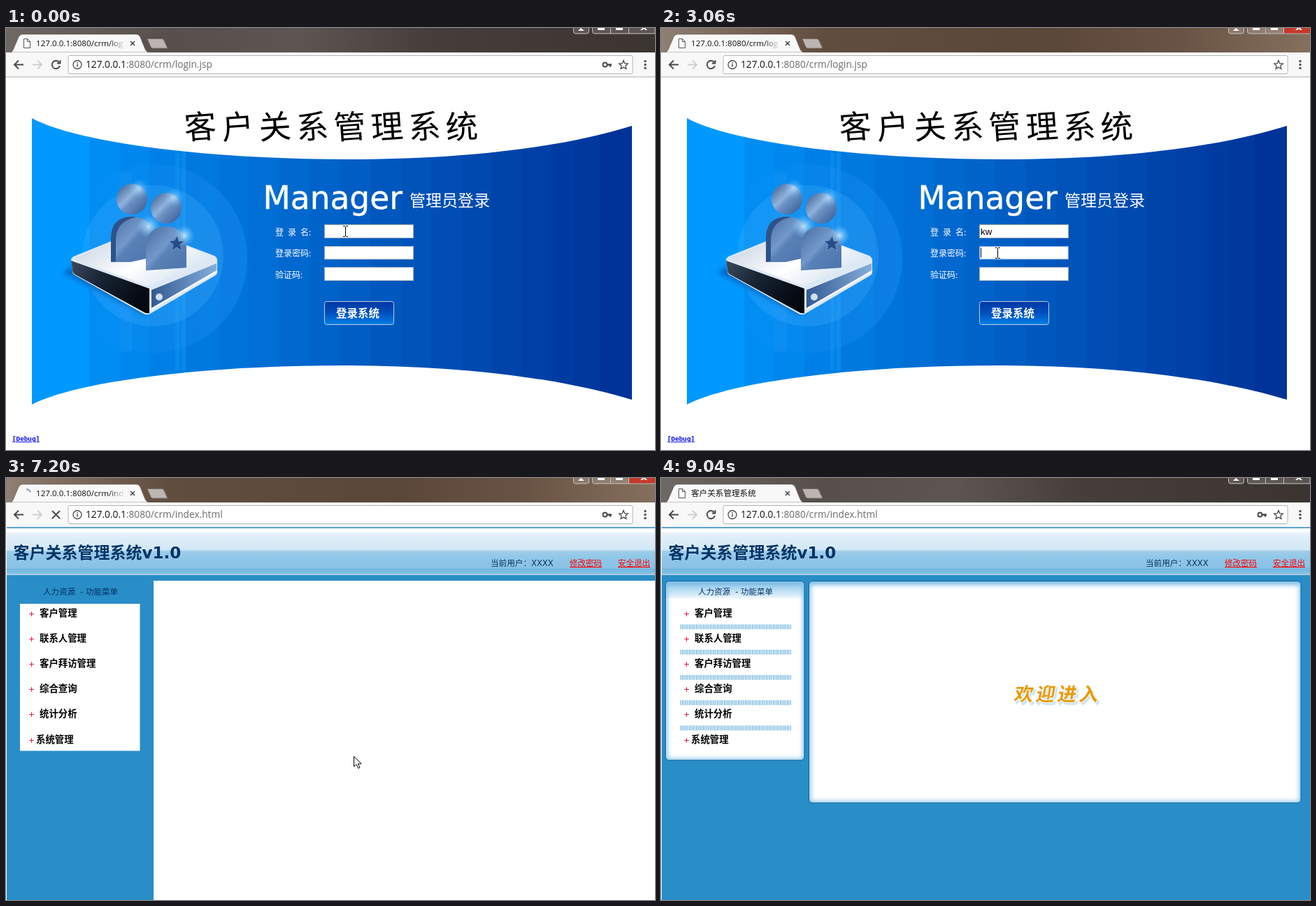
These frames come from a looping animation (928x604 px, 9.14 s). An HTML page:

```html
<!DOCTYPE html>
<html lang="zh">
<head>
<meta charset="utf-8">
<title>客户关系管理系统</title>
<style>
html, body { margin: 0; width: 100%; height: 100%; overflow: hidden; background: #fff; }
svg { display: block; width: 100vw; height: 100vh; }
text { font-family: "DejaVu Sans", "Noto Sans CJK SC", sans-serif; white-space: pre; }
.ui { font-family: "Open Sans", "Noto Sans CJK SC", sans-serif; }
.cjk { font-family: "Noto Sans CJK SC", "Noto Sans CJK", sans-serif; }
.field { font: 13.3px "Liberation Sans", sans-serif; }
.bold { font-weight: bold; }
.label { font-size: 12px; fill: #fff; }
.link { font-size: 11.5px; fill: #f00; text-decoration: underline; }
</style>
</head>
<body>
<svg viewBox="0 0 928 604">
<defs>
  <linearGradient id="barIdle">
    <stop offset="0" stop-color="#6e6865"/><stop offset=".25" stop-color="#574f4b"/>
    <stop offset=".45" stop-color="#5d5551"/><stop offset=".65" stop-color="#463e3b"/>
    <stop offset="1" stop-color="#3b3431"/>
  </linearGradient>
  <linearGradient id="barActive">
    <stop offset="0" stop-color="#8f7f74"/><stop offset=".1" stop-color="#7d6a5c"/>
    <stop offset=".25" stop-color="#614d3e"/><stop offset=".6" stop-color="#5b4737"/>
    <stop offset=".8" stop-color="#685344"/><stop offset="1" stop-color="#85705f"/>
  </linearGradient>
  <linearGradient id="tabFade">
    <stop offset="0" stop-color="#f8f8f8" stop-opacity="0"/><stop offset="1" stop-color="#f8f8f8"/>
  </linearGradient>
  <linearGradient id="halo">
    <stop offset=".15" stop-color="#2b9bff" stop-opacity="0"/><stop offset="1" stop-color="#2b9bff" stop-opacity=".3"/>
  </linearGradient>
  <linearGradient id="button" x2="0" y2="1">
    <stop offset="0" stop-color="#0037a6"/><stop offset=".5" stop-color="#0050bd"/><stop offset="1" stop-color="#0080e8"/>
  </linearGradient>
  <linearGradient id="person" y2="1">
    <stop offset="0" stop-color="#46699f"/><stop offset=".45" stop-color="#7399ca"/>
    <stop offset=".55" stop-color="#5981b6"/><stop offset="1" stop-color="#4c74ad"/>
  </linearGradient>
  <linearGradient id="head" x1=".1" y1=".1" x2=".9" y2=".9">
    <stop offset="0" stop-color="#4a6c9f"/><stop offset=".4" stop-color="#8fb2dc"/>
    <stop offset=".55" stop-color="#6b91c4"/><stop offset="1" stop-color="#3e639c"/>
  </linearGradient>
  <radialGradient id="shine"><stop offset="0" stop-color="#c8ecff" stop-opacity=".9"/><stop offset="1" stop-color="#6fc4ff" stop-opacity="0"/></radialGradient>
  <linearGradient id="slab" x2="1" y2=".6"><stop offset="0" stop-color="#b9c8da"/><stop offset=".6" stop-color="#fff"/><stop offset="1" stop-color="#d5e2f0"/></linearGradient>
  <linearGradient id="slabFront" x2="1" y2=".4"><stop offset="0" stop-color="#3b4a5e"/><stop offset=".45" stop-color="#182434"/><stop offset="1" stop-color="#050a12"/></linearGradient>
  <linearGradient id="slabSide"><stop offset="0" stop-color="#345a92"/><stop offset="1" stop-color="#86aedb"/></linearGradient>
  <linearGradient id="header" x2="0" y2="1">
    <stop offset="0" stop-color="#fff"/><stop offset=".06" stop-color="#fff"/><stop offset=".12" stop-color="#e3f0f9"/>
    <stop offset=".46" stop-color="#d2e7f5"/><stop offset=".49" stop-color="#9dcdea"/>
    <stop offset=".62" stop-color="#91c7e8"/><stop offset=".84" stop-color="#88c2e6"/>
    <stop offset=".87" stop-color="#75b7e0"/><stop offset=".96" stop-color="#82bfe4"/><stop offset="1" stop-color="#c3d4df"/>
  </linearGradient>
  <linearGradient id="menuHead" x2="0" y2="1"><stop offset="0" stop-color="#65b0df"/><stop offset=".35" stop-color="#a9d4ef"/><stop offset="1" stop-color="#ecf6fc"/></linearGradient>
  <linearGradient id="glow" x2="0" y2="1"><stop offset="0" stop-color="#72b8e4"/><stop offset="1" stop-color="#fff" stop-opacity="0"/></linearGradient>
  <pattern id="ticks" width="2.5" height="8" patternUnits="userSpaceOnUse"><rect width="1.3" height="8" fill="#74b5df"/></pattern>
  <filter id="soft" x="-20%" y="-20%" width="140%" height="140%"><feGaussianBlur stdDeviation="3"/></filter>
  <clipPath id="bannerClip">
    <path d="M37 129C105 166 300 188 490 188 660 188 800 170 895 140V532C800 503 660 483 480 483 290 483 105 504 37 539Z"/>
  </clipPath>
  <clipPath id="menuClip"><rect x="7" y="148" width="198" height="256" rx="5"/></clipPath>
  <clipPath id="mainClip"><rect x="212" y="148" width="703" height="317" rx="5"/></clipPath>
</defs>

<rect width="928" height="604" fill="#fff"/>

<g id="login">
  <g clip-path="url(#bannerClip)">
    <g id="stripes"></g>
    <path d="M162 207h18v256h-18zM242 178h6v312h-6zM251 178h6v312h-6z" fill="#2da0ff" opacity=".2"/>
    <circle cx="210" cy="330" r="135" fill="url(#halo)"/>
    <circle cx="210" cy="326" r="101" fill="#4db2ff" opacity=".24"/>
  </g>
  <path d="M80 350L100 338 206 396 200 412Z" fill="#0457ad" opacity=".65" filter="url(#soft)"/>
  <path d="M93 331Q94 328 99 326L188 290Q195 287 203 290L298 326Q303 329 302 335V350Q302 353 298 355L206 409Q201 412 195 408L99 354Q95 352 95 348Z" fill="#dce8f4"/>
  <path d="M96 330L192 291Q196 289 201 291L300 329 207 367Q203 369 198 367Z" fill="url(#slab)"/>
  <path d="M93 333L205 373V408Q200 409 196 406L99 353Q95 351 95 346Z" fill="url(#slabFront)"/>
  <path d="M208 375L301 337V347L208 401Z" fill="url(#slabSide)"/>
  <path d="M208 402L302 348" stroke="#fff" stroke-width="2"/>
  <circle cx="219" cy="385" r="5" fill="#cfe0f2"/>
  <path d="M150 335V300Q151 270 180 270 209 271 210 300V328L178 335Z" fill="url(#person)"/>
  <path d="M150 335V300Q151 270 180 270L186 271Q157 276 157 304V334Z" fill="#2f5288"/>
  <circle cx="180" cy="245" r="22" fill="url(#head)"/>
  <circle cx="204" cy="284" r="17" fill="url(#shine)"/>
  <path d="M200 347V315Q201 284 229 284 257 285 258 313V343Z" fill="url(#person)"/>
  <circle cx="229" cy="258" r="22" fill="url(#head)"/>
  <circle cx="255" cy="297" r="15" fill="url(#shine)"/>
  <circle cx="190" cy="230" r="14" fill="url(#shine)" opacity=".7"/>
  <circle cx="240" cy="243" r="14" fill="url(#shine)" opacity=".7"/>
  <path d="M245 297l2 8 8 0-6 5 3 9-8-5-7 5 2-9-6-5 8-1z" fill="#274c87" stroke="#83abd8" stroke-width=".7"/>

  <text class="cjk" x="256" y="159.500" font-size="46" font-weight="300" letter-spacing="7.4" rotate="-4">客户关系管理系统</text>
  <text x="367.500" y="259" font-size="45.5" fill="#fff" stroke="#fff" stroke-width=".4">Manager</text>
  <text class="cjk" x="577" y="254.500" font-size="23" fill="#fff">管理员登录</text>
  <text class="cjk label" x="385" y="296.500" word-spacing="3.3">登 录 名:</text>
  <text class="cjk label" x="385" y="326.500">登录密码:</text>
  <text class="cjk label" x="385" y="357.500">验证码:</text>
  <g fill="#fff" stroke="#9aa7b8">
    <rect id="nameBox" x="455.500" y="281.500" width="127" height="19"/>
    <rect id="passBox" x="455.500" y="312.500" width="127" height="18.500"/>
    <rect x="455.500" y="342.500" width="127" height="19"/>
  </g>
  <text id="name" class="field" x="457" y="295.500"></text>
  <g id="dots"></g>
  <rect id="caret" width="1" height="14"/>
  <g id="suggest">
    <rect id="suggestBox" x="455.500" y="301.500" width="129" fill="#fff" stroke="#a9b4c4"/>
    <text class="field bold" x="464" y="318.500">kw</text>
    <text id="second" class="field bold" x="464" y="340.500">k1</text>
  </g>
  <rect id="submit" x="455.500" y="391.500" width="99" height="33" rx="3" fill="url(#button)"/>
  <text class="cjk bold" x="472" y="413.500" font-size="15.5" fill="#fff">登录系统</text>
  <text x="9" y="591" style="font:bold 9.3px 'Liberation Mono',monospace" fill="#00e" text-decoration="underline">[Debug]</text>
</g>

<g id="index">
  <rect x="1" y="70" width="927" height="534" fill="#298dc8"/>
  <rect x="1" y="72" width="927" height="67" fill="url(#header)"/>
  <text class="bold" x="10.500" y="115" font-size="23" fill="#036">客户关系管理系统v1.0</text>
  <text x="693" y="126" font-size="11.6" fill="#0a3560">当前用户：XXXX</text>
  <text class="link" x="806" y="126">修改密码</text>
  <text class="link" x="875" y="126">安全退出</text>
  <g id="bare">
    <rect x="211" y="147" width="717" height="457" fill="#fff"/>
    <rect x="20" y="180" width="171.500" height="210.500" fill="#fff"/>
  </g>
  <g id="panels">
    <rect x="7" y="148" width="198" height="256" rx="5" fill="#fff"/>
    <g clip-path="url(#menuClip)">
      <rect x="7" y="148" width="198" height="24" fill="url(#menuHead)"/>
      <rect x="6" y="147" width="200" height="258" rx="6" fill="none" stroke="#8cc6ea" stroke-width="7" filter="url(#soft)"/>
    </g>
    <rect x="6.500" y="147.500" width="198.500" height="256.500" rx="5" fill="none" stroke="#0b619c"/>
    <rect x="212" y="148" width="703" height="317" rx="5" fill="#fff"/>
    <g clip-path="url(#mainClip)">
      <rect x="212" y="148" width="703" height="13" fill="url(#glow)"/>
      <rect x="211" y="147" width="705" height="319" rx="6" fill="none" stroke="#8cc6ea" stroke-width="7" filter="url(#soft)"/>
    </g>
    <rect x="211.500" y="147.500" width="703.500" height="317.500" rx="5" fill="none" stroke="#0b619c"/>
    <g id="dividers" fill="url(#ticks)"></g>
    <g transform="translate(504 319) skewX(-10)" class="bold" font-size="27" letter-spacing="4">
      <text class="cjk" x="3" y="3" fill="#cfe5f2" stroke="#cfe5f2" stroke-width="2">欢迎进入</text>
      <text class="cjk" fill="#e59c0c" stroke="#fff" stroke-width="2" paint-order="stroke">欢迎进入</text>
    </g>
  </g>
  <text x="53" y="167" font-size="11.5" font-weight="500" fill="#036">人力资源  - 功能菜单</text>
  <g id="menu" font-size="13.4"></g>
  <path d="M1 70.750H928" stroke="#6fa9cf" stroke-width="1.500"/>
</g>

<g id="chrome">
  <rect id="bar" width="928" height="35"/>
  <path d="M7 35Q10 33 12 27L18 13Q20 9 24 9H186Q190 9 192 13L198 28Q200 34 204 35Z" fill="#f8f8f8" stroke="#5a504b" stroke-width=".6"/>
  <path d="M202 15.500H223Q225 15.500 226 18L231 29H210Q208 29 207 27Z" fill="#bdb5b1" stroke="#756a64" stroke-width=".8"/>
  <g stroke="#c9c2bf" fill="#fff" fill-opacity=".16">
    <path d="M811.500-1V5q0 3 3 3h16q3 0 3-3V-1zM838.500-1V5q0 3 3 3H928V-1zM864.500-1V8M890.500-1V8"/>
  </g>
  <path id="closeRed" d="M891 0H928V7.500H891Z" fill="#c5392b"/>
  <path d="M818 4h9l-5-4zM846 0h10v3h-10zM872 0v3h10V0zM907 3l3-3h4l3 3h-3l-2-2-2 2z" fill="#fff"/>
  <rect y="35" width="928" height="35" fill="#f8f8f8"/>
  <path id="chromeLine" d="M0 70H928" stroke="#a9a9a9"/>
  <path id="page" d="M25.500 15.500h5l4 4v9h-9zM30.500 15.500v4h4" fill="#fff" stroke="#555"/>
  <path id="spinner" d="M29 16.500q4-1 6 4" fill="none" stroke="#8aa0b8" stroke-width="2"/>
  <text id="tab" class="ui" x="43" y="26" font-size="11.6" fill="#111"></text>
  <rect x="148" y="13" width="22" height="17" fill="url(#tabFade)"/>
  <path d="M178 19l6 6M184 19l-6 6" stroke="#444" stroke-width="1.500"/>
  <rect x="89" y="39.500" width="807" height="26" rx="2" fill="#fff" stroke="#b4b4b4"/>
  <g fill="none" stroke="#484848" stroke-width="1.900">
    <path d="M25 52.500H12M18 46.500l-6 6 6 6"/>
    <path d="M38 52.500H51M45 46.500l6 6-6 6" stroke="#cfcfcf"/>
    <path id="reload" d="M76 49A5.700 5.700 0 1 0 77 54M77.500 46v4.500H73"/>
    <path id="stop" d="M66 47l11 11M77 47l-11 11"/>
    <circle cx="102" cy="52.500" r="6" stroke-width="1.300"/>
    <path d="M102 51.500v4M102 49v1.500" stroke-width="1.500"/>
    <path d="M883 46.500l1.800 4.200 4.500.4-3.400 3 1 4.400-3.900-2.400-3.900 2.400 1-4.400-3.400-3 4.500-.4z" stroke-width="1.300"/>
    <g id="key"><circle cx="856.500" cy="52.500" r="3"/><path d="M859.500 52.500H866M864 52.500v3" stroke-width="2.400"/></g>
  </g>
  <path d="M912.500 46h3v3h-3zM912.500 51h3v3h-3zM912.500 56h3v3h-3z" fill="#555"/>
  <text class="ui" x="114" y="57" font-size="13.7" fill="#6a6a6a"><tspan fill="#111">127.0.0.1</tspan><tspan id="path"></tspan></text>
</g>

<g id="cursor" stroke="#000" fill="#fff">
  <path id="beam" d="M-3.500-7.500h2.500l1 1 1-1h2.500M0-6.500V6.500M-3.500 7.500h2.500l1-1 1 1h2.500" fill="none"/>
  <path id="arrow" d="M.500.500V15l3.400-3.200 2.700 5.700 2.300-1-2.600-5.500H11Z"/>
  <path id="hand" d="M1 2q0-2 1.700-2T4.500 2V7l1-.600 2 .800 1.500 0 1.500 1 1.500.600V14l-2 3v3.500H2V18L-2 12.500Q-4 9.500-2.500 9T1 12Z"/>
</g>
</svg>

<script>
const LOOP = 9140;
const $ = id => document.getElementById(id);
const show = (id, on) => $(id).setAttribute('display', on ? 'inline' : 'none');
const within = (t, from, to) => t >= from && t < to;

function add(parent, tag, attrs, text = '') {
  const el = document.createElementNS('http://www.w3.org/2000/svg', tag);
  for (const key in attrs) el.setAttribute(key, attrs[key]);
  el.textContent = text;
  $(parent).append(el);
}

const edges = [37, 119, 162, 205, 257, 306, 347, 390, 434, 478, 521, 565, 608, 652, 694, 737, 780, 812, 849, 896];
edges.slice(1).forEach((right, i) => {
  const left = edges[i];
  const k = (((left + right) / 2 - 78) / 794.5) ** .85;
  add('stripes', 'rect', {
    x: left, y: 120, width: right - left + .5, height: 425,
    fill: `rgb(0 ${153 - 102 * k} ${255 - 102 * k})`
  });
});

['客户管理', '联系人管理', '客户拜访管理', '综合查询', '统计分析', '系统管理'].forEach((item, i) => {
  const y = 197.5 + i * 36.2;
  add('menu', 'text', { x: 32, y, fill: '#e0002a', 'font-size': 11 }, '+');
  add('menu', 'text', { x: i < 5 ? 48 : 43, y, class: 'cjk bold' }, item);
  if (i < 5) add('dividers', 'rect', { x: 27, y: y + 12, width: 159, height: 7 });
});

for (let i = 0; i < 5; i++) add('dots', 'circle', { cx: 459.4 + i * 4.65, cy: 321.7, r: 1.9 });

// Cursor stops: time, shape, x, y
const stops = [
  [0, 'beam', 485.5, 291], [2100, 'beam', 486.5, 284.5], [2220, 'beam', 486.5, 288],
  [2360, 'beam', 486.5, 295], [2500, 'arrow', 485, 304], [2640, 'arrow', 483, 313],
  [2780, 'arrow', 482, 320], [2920, 'beam', 481.5, 322], [6190, 'arrow', 490, 366],
  [6340, 'arrow', 497, 398], [6620, 'hand', 497, 398], [7050, 'arrow', 497, 398],
  [7350, 'hand', 497, 398], [7940, 'arrow', 531, 417], [8080, 'arrow', 630, 458],
  [8230, 'arrow', 765, 520], [8370, 'arrow', 906, 588], [8510, 'none', 0, 0]
];
const dotTimes = [3860, 4140, 4570, 4870, 5640];
// Visible caret spans: from, to, x
const nameCaret = [[590, 1020, 457], [1420, 1700, 464], [1700, 2100, 475]];
const passCaret = [[3060, 3610], [3860, 5490], [5640, 6190], [6620, 7050]];

function render(t) {
  const onIndex = t >= 7200, done = t >= 7350, active = within(t, 590, 9040);
  const loading = within(t, 7050, 7350);

  $('bar').setAttribute('fill', `url(#${active ? 'barActive' : 'barIdle'})`);
  show('closeRed', active);
  show('page', !loading);
  show('spinner', onIndex && !done);
  show('reload', !loading);
  show('stop', loading);
  show('key', !within(t, 1420, 3860));
  show('chromeLine', !onIndex);
  const path = onIndex ? ':8080/crm/index.html' : ':8080/crm/login.jsp';
  $('path').textContent = path;
  $('tab').textContent = done ? '客户关系管理系统' : '127.0.0.1' + path.slice(0, 13);

  show('login', !onIndex);
  show('index', onIndex);
  show('bare', !done);
  show('panels', done);

  $('name').textContent = 'kw'.slice(0, (t >= 1420) + (t >= 1700));
  const border = (id, on) => $(id).setAttribute('stroke', on ? '#5f9be8' : '#9aa7b8');
  border('nameBox', within(t, 590, 2920));
  border('passBox', within(t, 2920, 7050));
  $('submit').setAttribute('stroke', loading ? '#77a9f5' : '#c3cbd8');

  show('suggest', within(t, 1420, 2920));
  show('second', t < 1700);
  $('suggestBox').setAttribute('height', t < 1700 ? 47 : 25);

  const typed = dotTimes.filter(time => t >= time).length;
  [...$('dots').children].forEach((dot, i) => dot.setAttribute('display', i < typed ? 'inline' : 'none'));

  const inName = nameCaret.find(([from, to]) => within(t, from, to));
  const inPass = passCaret.some(([from, to]) => within(t, from, to));
  show('caret', inName || inPass);
  $('caret').setAttribute('x', inName ? inName[2] : 457 + Math.round(typed * 4.65));
  $('caret').setAttribute('y', inName ? 284 : 314.5);

  const [, shape, x, y] = stops.findLast(stop => t >= stop[0]);
  for (const id of ['beam', 'arrow', 'hand']) show(id, id === shape);
  $('cursor').setAttribute('transform', `translate(${x} ${y})`);
}

function tick() {
  render(performance.now() % LOOP);
  requestAnimationFrame(tick);
}
tick();
</script>
</body>
</html>
```
